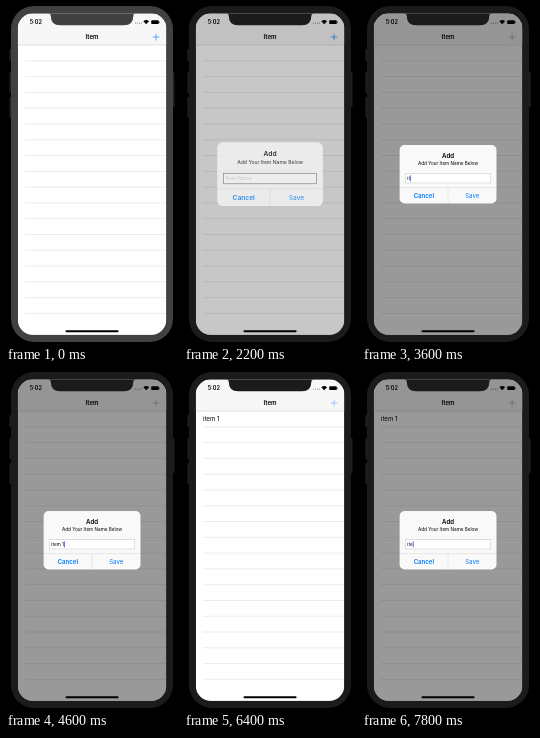
Write an HTML page that moves like this. It is 172 px wide and 338 px high and loops after 8000 ms.

```html
<!DOCTYPE html>
<html lang="en">
<head>
<meta charset="utf-8">
<title>Item list</title>
<style>
  html, body { margin: 0; width: 100%; height: 100%; overflow: hidden; background: #000; }
  svg { display: block; width: 172px; height: 338px; font-family: Inter, "Liberation Sans", sans-serif; }
  text { font-size: 17px; white-space: pre; }
  .bold { font-weight: 600; }
  .mid { text-anchor: middle; }
  .small { font-size: 13px; }
  .clock { font-size: 15.5px; }
  .blue { fill: #007aff; }
  .hair { stroke: #c8c7cc; }
  .case { fill: #1b1b1b; animation: case 8s step-end infinite; }
  @keyframes case { 0% { fill: #414141; } 10%, 100% { fill: #1b1b1b; } }
</style>
</head>
<body>
<svg viewBox="0 0 172 338">
  <defs>
    <clipPath id="screen"><rect width="414" height="896" rx="42"/></clipPath>
  </defs>
  <g fill="#1e1e1e">
    <rect x="3.4" y="43" width="3" height="12" rx="1"/>
    <rect x="3.4" y="66" width="3" height="21" rx="1"/>
    <rect x="3.4" y="91" width="3" height="21" rx="1"/>
    <rect x="165.6" y="66" width="3" height="35" rx="1"/>
  </g>
  <rect class="case" x="5" y="0" width="162" height="336" rx="23"/>

  <!-- screen in points, 414 by 896 -->
  <g transform="translate(11.8 7.5) scale(.3587)">
    <g clip-path="url(#screen)">
      <rect width="414" height="896" fill="#fff"/>
      <g id="rows" class="hair"></g>
      <text id="item" x="20" y="116">item 1</text>
      <rect width="414" height="88" fill="#f7f7f7"/>
      <path d="M0 88H414" stroke="#b2b2b2"/>
      <text class="bold mid" x="207" y="72">Item</text>
      <path id="plus" d="M376 65.5h19M385.5 56v19" stroke-width="1.7"/>
      <text class="bold clock" x="33" y="30">5:02</text>
      <g fill="#999">
        <circle cx="328" cy="27" r="1.7"/><circle cx="333.5" cy="27" r="1.7"/>
        <circle cx="339" cy="27" r="1.7"/><circle cx="344.5" cy="27" r="1.7"/>
      </g>
      <path d="M350 21.5Q358 15 366 21.5L358 30Z"/>
      <rect x="372" y="19" width="21" height="10.5" rx="2.5"/>
      <rect x="394" y="22.5" width="1.5" height="4" rx=".7"/>
      <rect x="133" y="883" width="148" height="5.5" rx="2.7"/>
      <rect id="dim" width="414" height="896"/>
      <path class="case" d="M86 -2V0q6 0 6 7q0 26 26 26H296q26 0 26 -26q0 -7 6 -7V-2Z"/>

      <g id="alert">
        <rect x="-135" y="-81.5" width="270" height="163" rx="14" fill="#f9f9f9"/>
        <text class="bold mid" y="-46">Add</text>
        <text class="small mid" y="-25">Add Your Item Name Below</text>
        <rect id="field" x="-119" y="-1.5" width="238" height="26" fill="#fff" stroke-width="1.5"/>
        <text id="hint" class="small" x="-113.5" y="16" fill="#c7c7cc">Item Name</text>
        <text id="typed" class="small" x="-113.5" y="16"></text>
        <rect id="caret" y="3" width="2.4" height="17" fill="#426bf2"/>
        <path class="hair" d="M-135 37.5H135M0 37.5V81.5"/>
        <text class="bold mid blue" x="-67.5" y="65">Cancel</text>
        <text class="mid blue" x="67.5" y="65">Save</text>
      </g>
    </g>
  </g>
</svg>
<script>
  const el = id => document.getElementById(id);
  const set = (id, attrs) => {
    for (const k in attrs) el(id).setAttribute(k, attrs[k]);
  };
  const show = (id, on) => set(id, { visibility: on ? 'visible' : 'hidden' });

  const LOOP = 8000, TICK = 100;
  const TAPS = [1700, 6300], OPEN_DELAY = 420, CLOSE = 5030, ADDED = 5500;
  const KEYS = [[0, ''], [3200, 'i'], [3600, 'it'], [3700, 'ite'], [3900, 'item'],
    [4200, 'item '], [4500, 'item 1'], [6300, ''], [7200, 'i'], [7700, 'it'], [7800, 'ite']];

  // critically damped, 0 to 1
  const spring = ms => {
    const x = Math.max(0, ms) * .0228;
    return 1 - (1 + x) * Math.exp(-x);
  };

  let lines = '';
  for (let y = 132; y < 840; y += 44) lines += `<path d="M20 ${y}H414"/>`;
  el('rows').innerHTML = lines;

  function draw(now) {
    const t = Math.floor(now % LOOP / TICK) * TICK;
    const tap = TAPS.filter(s => s <= t).pop() ?? LOOP;
    const age = t - tap;
    const closing = t >= CLOSE && t < TAPS[1];
    const p = closing ? 1 - spring(t - CLOSE) : spring(age - OPEN_DELAY);
    const scale = closing ? 1 : 1.2 - .2 * p;
    const moving = p < .95;

    set('dim', { opacity: .4 * p });
    set('alert', {
      opacity: Math.min(1, 1.35 * p),
      transform: `translate(207 448) scale(${scale})`
    });
    set('field', { stroke: moving ? '#555' : '#c8c8cc', 'fill-opacity': moving ? .5 : 1 });
    const pressed = age >= 0 && age < 400;
    set('plus', {
      stroke: p > (closing ? .2 : .8) ? '#999' : '#007aff',
      opacity: pressed ? 1 - .45 * Math.sin(Math.PI * (age + 100) / 500) : 1
    });
    show('item', t >= ADDED);

    const word = KEYS.filter(k => k[0] <= t).pop()[1];
    el('typed').textContent = word;
    show('hint', !word);
    set('caret', { x: -113.5 + (word ? el('typed').getComputedTextLength() + .5 : -1.5) });
    show('caret', !moving && (word || age % 1200 < 1000));
  }

  function frame(now) {
    draw(now);
    requestAnimationFrame(frame);
  }
  draw(0);
  requestAnimationFrame(frame);
</script>
</body>
</html>
```
